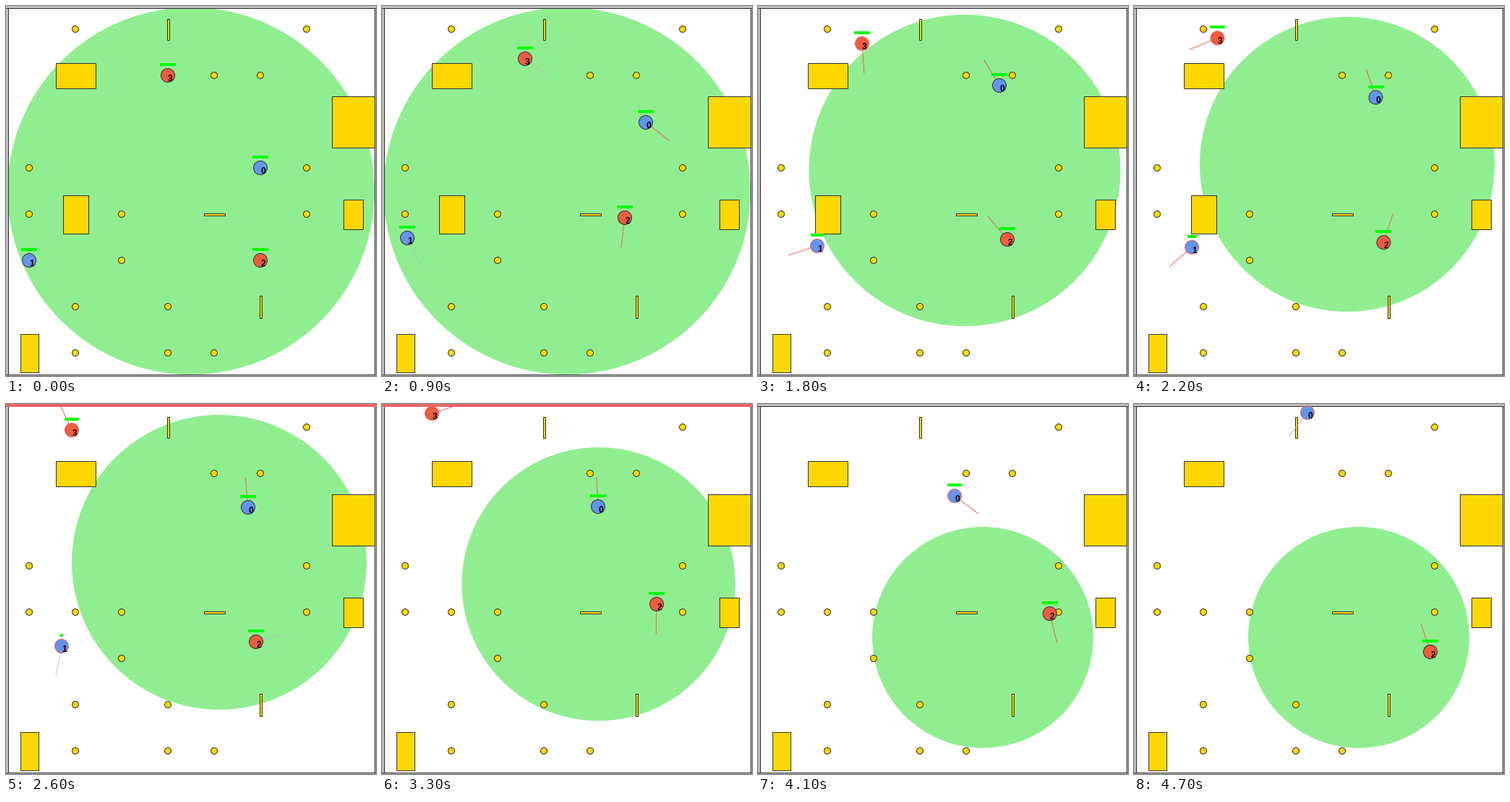
A matplotlib script that plays this animation: 512x512 px, repeating every 4.8 s.

```python
import numpy as np
import matplotlib.pyplot as plt
from matplotlib.animation import FuncAnimation
from matplotlib.patches import Circle, Rectangle

SIZE, DPI, FRAMES, STEP_MS = 512, 64, 48, 100
PX = 72 / DPI
CELL, GUN, RELOAD = 64, 41, 16
BEATS = (0, 9, 18, 26, 33, 37, 42, 47)
GOLD, GREEN, INK, GRAY = "#ffd700", "#90ee90", "#303030", "#bebebe"
RED, BLUE = "#ee5c42", "#6495ed"
HIT, FIRE = "#ee6363", "#ff5050"


def smooth(points):
    """Monotone cubic curve through points, one per beat."""
    v = np.array(points, float)
    t = np.array(BEATS[:len(v)], float)
    slope = np.diff(v, axis=0) / np.diff(t)[:, None]
    a, b = slope[:-1], slope[1:]
    same = a * b > 0
    mid = np.where(same, 2 * a * b / np.where(same, a + b, 1), 0)
    m = np.vstack([slope[:1], mid, slope[-1:]])

    def at(f):
        f = min(f, t[-1])
        i = min(np.searchsorted(t, f, side="right") - 1, len(t) - 2)
        h = t[i + 1] - t[i]
        u = (f - t[i]) / h
        ease = u * u * (3 - 2 * u)
        return (v[i] + (v[i + 1] - v[i]) * ease
                + h * u * (1 - u) * (m[i] * (1 - u) - m[i + 1] * u))
    return at


def zone(f):
    """Centre and radius of the safe area: two linear shrinks."""
    c = np.array([256, 256, 254])
    for start, goal in ((10.3, (295, 219, 204)), (30.1, (311, 323, 153))):
        c = c + (np.array(goal) - c) * np.clip((f - start) / 10, 0, 1)
    return c


fig = plt.figure(figsize=(SIZE / DPI, SIZE / DPI), dpi=DPI, facecolor="white")
ax = fig.add_axes([0, 0, 1, 1])
ax.set_xlim(0, SIZE)
ax.set_ylim(SIZE, 0)
ax.axis("off")


def box(cx, cy, w, h, **kw):
    style = dict(fc=GOLD, ec=INK, lw=PX, zorder=2) | kw
    return ax.add_patch(Rectangle((cx - w / 2, cy - h / 2), w, h, **style))


def disk(cx, cy, r, **kw):
    style = dict(fc=GOLD, ec=INK, lw=PX, zorder=2) | kw
    return ax.add_patch(Circle((cx, cy), r, **style))


def mid(cell):
    return CELL * (cell + 0.5)


class Agent:
    """Track points are (x, y, aim in degrees)."""

    def __init__(self, name, color, track, ready, hurt=FRAMES, death=FRAMES + 2):
        self.track, self.ready = smooth(track), ready
        self.hurt, self.death = hurt, death
        z = 4 + name * 0.1
        self.gun, = ax.plot([], [], lw=0.9 * PX, zorder=z)
        self.body = disk(0, 0, 9.5, fc=color, zorder=z + 0.02)
        self.bar = box(0, 0, 22, 4, fc="#00ff00", lw=0, zorder=z + 0.04)
        self.label = ax.text(0, 0, str(name), family="Liberation Sans", weight="bold",
                             size=12 * PX, ha="center", va="baseline",
                             color="black", zorder=z + 0.06)
        self.parts = [self.gun, self.body, self.bar, self.label]

    def update(self, f, area):
        """Place the agent; tell whether its shot reaches the top wall."""
        alive = f < self.death
        for p in self.parts:
            p.set_visible(alive)
        x, y, aim = self.track(f)
        a = np.radians(aim)
        tx, ty = x + GUN * np.cos(a), y + GUN * np.sin(a)
        firing = alive and f > 0 and (f - self.ready) % RELOAD >= 3
        self.gun.set_data([x, tx], [y, ty])
        self.gun.set_color(FIRE if firing else GRAY)
        self.gun.set_visible(alive and f > 0)
        outside = np.hypot(x - area[0], y - area[1]) > area[2]
        self.body.center = x, y
        self.body.set_edgecolor(HIT if outside else INK)
        harm = np.clip((f - self.hurt) / (self.death - self.hurt), 0, 1)
        w = 22 * (1 - harm**3)
        self.bar.set_bounds(x - w / 2, y - 17, w, 4)
        self.label.set_position((x + 3.5, y + 8))
        return firing and ty < 2


safe = disk(256, 256, 254, fc=GREEN, lw=0, zorder=1)

# columns of the dots in each row of the 8 x 8 board
rows = ((6,), (4, 5), (), (0, 6), (0, 1, 2, 6), (2,), (1, 3), (1, 3, 4))
for r, cols in enumerate(rows):
    for c in cols:
        disk(mid(c), mid(r), 4.5)
pickup = disk(mid(1), mid(0), 4.5)

for c, r, w, h in ((1, 1, 55, 35), (7, 2, 59, 71), (7, 4, 27, 41), (0, 7, 25, 53),
                   (3, 0, 3, 29), (4, 4, 29, 3), (5, 6, 3, 31)):
    box(mid(c), mid(r), w, h)
crate = box(mid(1), mid(4), 35, 53)

for side in (0, SIZE):
    box(side, SIZE / 2, 5, SIZE + 8, fc=GRAY, zorder=3)
box(SIZE / 2, SIZE, SIZE + 8, 5, fc=GRAY, zorder=3)
top = box(SIZE / 2, 0, SIZE + 8, 5, fc=GRAY, zorder=3)

agents = [
    Agent(0, BLUE, [(352, 224, 10), (365, 161, 38), (334, 110, -121), (335, 143, -95),
                    (299, 142, -93), (286, 130, -13), (268, 126, 50), (240, 12, 128)],
          ready=14, hurt=33),
    Agent(1, BLUE, [(32, 352, -135), (35, 321, 63), (82, 332, 162), (77, 335, 101)],
          ready=8, hurt=8, death=27),
    Agent(2, RED, [(352, 352, 0), (336, 293, 97), (345, 323, 230), (346, 329, 346),
                   (380, 277, 451), (397, 267, 524), (405, 298, 407), (410, 343, 252)],
          ready=10),
    Agent(3, RED, [(224, 96, -85), (198, 73, 37), (144, 52, 86), (91, 36, 245),
                   (69, 13, 342)],
          ready=7, hurt=17, death=35),
]


def draw(f):
    area = zone(f)
    safe.center = area[:2]
    safe.set_radius(area[2])
    pickup.set_visible(f < 24)
    crate.set_visible(f < 23)
    struck = any([a.update(f, area) for a in agents])
    top.set_facecolor(HIT if struck else GRAY)
    top.set_edgecolor(HIT if struck else INK)
    return []


anim = FuncAnimation(fig, draw, frames=FRAMES, interval=STEP_MS, repeat=True,
                     repeat_delay=0, init_func=lambda: draw(0))
plt.show()
```
